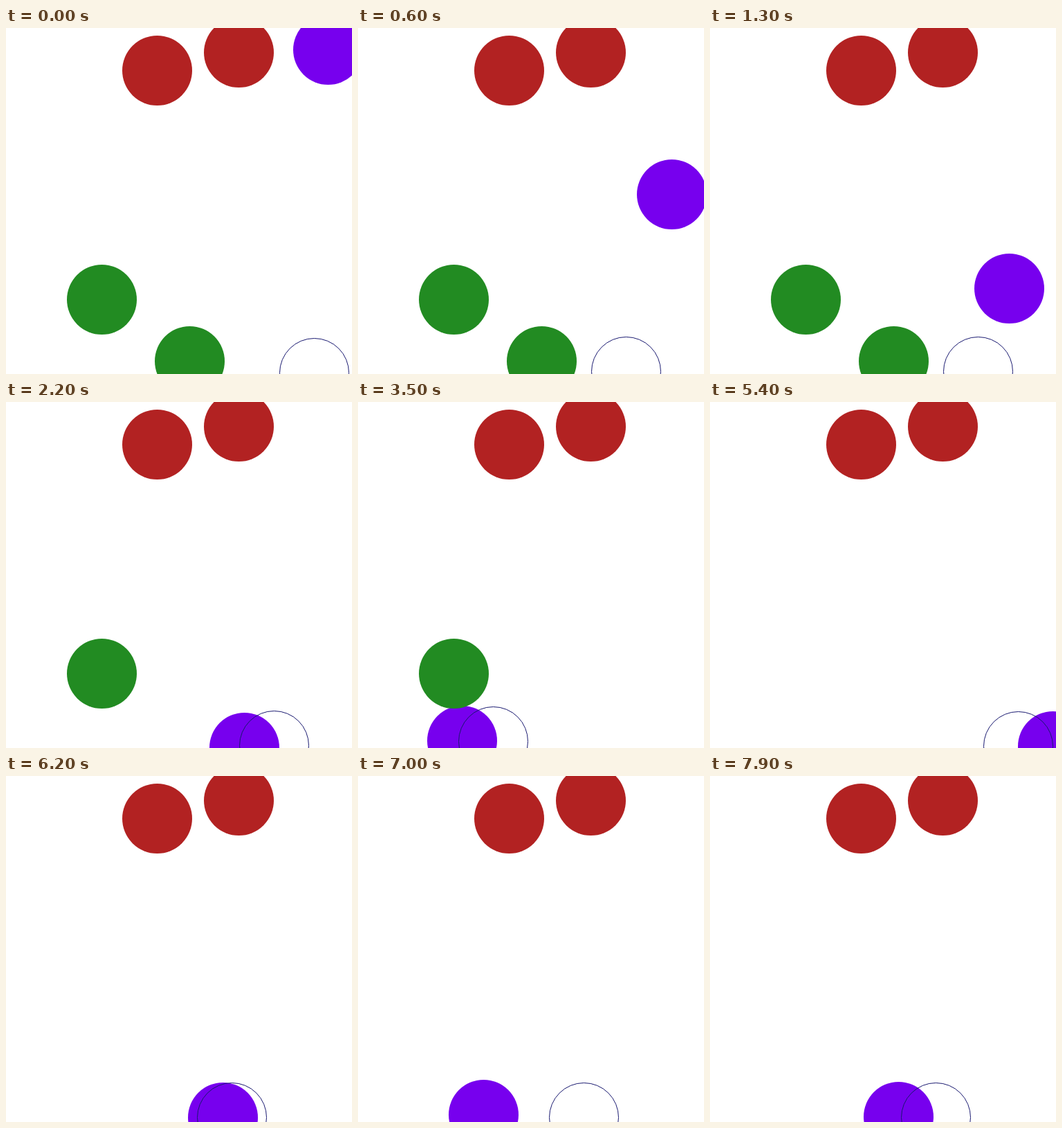
An HTML page for the animation above (8 s loop, 500x500 px).

```html
<!DOCTYPE html>
<html lang="en">
<head>
<meta charset="utf-8">
<title>Circles</title>
<style>
  html, body { margin: 0; width: 100%; height: 100%; overflow: hidden; background: #fff; }
  svg { display: block; width: 100vw; height: 100vh; }
</style>
</head>
<body>
<svg id="stage" viewBox="0 0 500 500"></svg>
<script>
const LOOP = 8000, STEP = 100;
const stage = document.getElementById('stage');

function addCircle(x, y, attrs) {
  const el = document.createElementNS('http://www.w3.org/2000/svg', 'circle');
  for (const [k, v] of Object.entries({ r: 50.5, ...attrs })) el.setAttribute(k, v);
  stage.append(el);
  place(el, x, y);
  return el;
}

// Centres sit in the middle of a pixel
function place(el, x, y) {
  el.setAttribute('cx', Math.round(x) + 0.5);
  el.setAttribute('cy', Math.round(y) + 0.5);
}

const RED = { fill: '#b22222' }, GREEN = { fill: '#228b22' };
addCircle(218, 61, RED);
addCircle(336, 35, RED);
const mover = addCircle(465, 31, { fill: '#7700ee' });
const greens = [
  { el: addCircle(265, 481, GREEN), until: 2000 },
  { el: addCircle(138, 392, GREEN), until: 3600 }
];
const ring = addCircle(445, 498, { r: 50, fill: 'none', stroke: '#191970' });

// Smooth monotone curve through [time, value] keys
function curve(keys) {
  const n = keys.length - 1;
  const slope = i => (keys[i + 1][1] - keys[i][1]) / (keys[i + 1][0] - keys[i][0]);
  const tangent = i => {
    if (i === 0) return 1.5 * slope(0) - 0.5 * tangent(1);
    if (i === n) return 1.5 * slope(n - 1) - 0.5 * tangent(n - 1);
    const a = slope(i - 1), b = slope(i);
    return a * b > 0 ? 2 * a * b / (a + b) : 0;
  };
  return t => {
    let i = 0;
    while (i < n - 1 && t >= keys[i + 1][0]) i++;
    const [t0, v0] = keys[i], [t1, v1] = keys[i + 1];
    const h = t1 - t0, s = (t - t0) / h, r = 1 - s;
    return v0 * (1 + 2 * s) * r * r + v1 * s * s * (3 - 2 * s)
      + h * s * r * (tangent(i) * r - tangent(i + 1) * s);
  };
}

// The mover drops, then swings from side to side along a slightly sloping floor
const floorY = x => 485 + 0.024 * x;
const LANDED = 2800;
const swing = curve([
  [0, 465], [1300, 432], [2200, 344], [2700, 309], [3500, 150], [3750, 117],
  [4500, 312], [5300, 500], [6200, 313], [7100, 178], [7900, 272]
]);
const drop = curve([[0, 31], [900, 316], [1300, 376], [2200, 499], [LANDED, floorY(swing(LANDED))]]);

const ringStops = [
  { from: 0, x: 445, y: 498 },
  { from: 500, x: 387, y: 496 },
  { from: 2400, x: 195, y: 490 },
  { from: 3700, x: 445, y: 497 },
  { from: 5600, x: 326, y: 493 }
];

function draw(time) {
  const t = Math.floor((time % LOOP) / STEP) * STEP;
  const x = swing(t);
  place(mover, x, t < LANDED ? drop(t) : floorY(x));
  const stop = ringStops.findLast(s => s.from <= t);
  place(ring, stop.x, stop.y);
  for (const g of greens) g.el.setAttribute('visibility', t < g.until ? 'visible' : 'hidden');
}

const start = performance.now();
function tick() {
  draw(performance.now() - start);
  requestAnimationFrame(tick);
}
tick();
</script>
</body>
</html>
```
